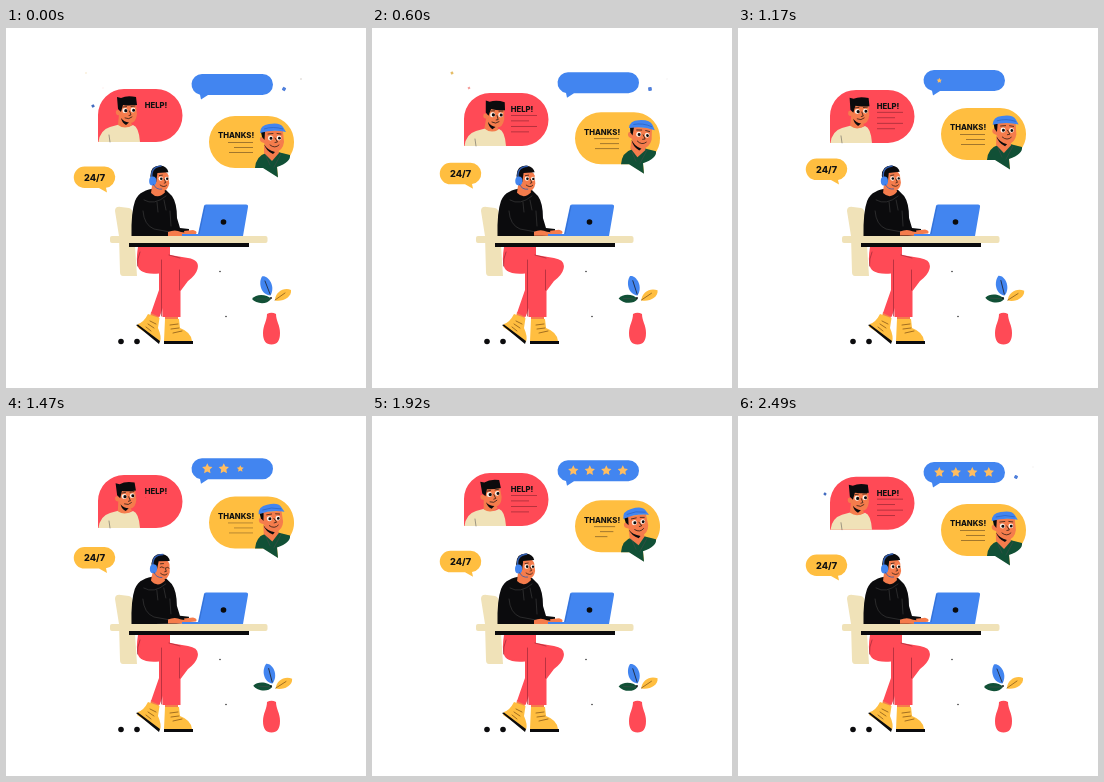
An HTML page for the animation above (2520 ms loop, 360 px wide and 360 px high).

```html
<!DOCTYPE html>
<html lang="en">
<head>
<meta charset="utf-8">
<title>Support desk</title>
<style>
  html, body { margin: 0; height: 100%; overflow: hidden; background: #fff; }
  svg { display: block; width: 100vw; height: 100vh; }
  text { font: 800 7.7px Inter, sans-serif; fill: #111; }
  .red { fill: #ff4a56; }
  .yellow { fill: #ffbe40; }
  .blue { fill: #4285f0; }
  .cream { fill: #f0e2b8; }
  .green { fill: #115036; }
  .black { fill: #0b0b0d; }
  .white { fill: #fff3e8; }
  .skin { fill: #f57c4c; }
  .line { fill: none; stroke: #16120f; stroke-width: .7; stroke-linecap: round; stroke-linejoin: round; }
  .seam { stroke: #9e2937; }
  .fold { stroke: #4b4b4b; stroke-width: .5; }
  .detail { stroke: #7a4c13; }
</style>
</head>
<body>
<svg viewBox="0 0 360 360">
  <g id="confetti"></g>

  <g id="rating">
    <path class="blue" d="M196 46H256.500A10.500 10.500 0 0 1 256.500 67H202L195 71.500L194 66.800A10.500 10.500 0 0 1 196 46Z"/>
    <g id="stars"></g>
  </g>

  <g id="help">
    <path class="red" d="M92 114V87A26 26 0 0 1 118 61H150A26 26 0 0 1 150 114Z"/>
    <path class="cream" d="M92.500 114Q94 102 104 99L113 96.500Q120 101 127 97Q133 99 134 114Z"/>
    <path class="line fold" d="M103 107L104 114"/>
    <g id="helpHead">
      <path class="skin" d="M113 86L112 97Q119 102 126 97L124 92Z"/>
      <path class="skin" d="M113 75Q121 72 130 75L131 86Q130 95 124 95Q116 94 114 87Q109 88 110 83Q111 81 114 83Z"/>
      <path class="black" d="M111 69L115 70Q121 67 130 69L131 77Q122 78 117 77L115 84L112 81Z"/>
      <g class="eyes">
        <g class="white"><circle cx="119" cy="82.500" r="2.500"/><circle cx="127" cy="82" r="2.400"/></g>
        <g class="black"><circle cx="119.800" cy="82.700" r="1.600"/><circle cx="127.600" cy="82.200" r="1.500"/></g>
      </g>
      <path class="line" d="M117 79L120.500 78.500M125 78.500L129 78M123.500 83L125 87L123 87.500M119 90Q123 92 126 89"/>
      <path class="black" d="M115 90Q118 94 123 94.500L120 97Q116 95 115 90Z"/>
    </g>
    <text x="138.800" y="80">HELP!</text>
    <g id="helpLines"></g>
  </g>

  <g id="thanks">
    <path class="yellow" d="M229 88H262A26 26 0 0 1 271 138.400L272 149L258 140H229A26 26 0 0 1 229 88Z"/>
    <path class="green" d="M249 140Q250 128 260 125L272 124L284 127Q285 134 271 139L272 149.500L257 140Z"/>
    <path class="line fold" d="M260 128L264 137M275 126L268 139"/>
    <g id="thanksHead">
      <path class="skin" d="M258 117V125L266 133L273 125L272 118Z"/>
      <path class="skin" d="M257 103H277L278 114Q277 122 270 124Q261 122 258 115Q253 114 254 110Q255 108 257 110Z"/>
      <path class="black" d="M255 104H259L258.500 112L256 109Z"/>
      <path class="blue" d="M254 105Q254 97 263 96Q274 94 277 99L280 104Q267 101 254 105Z"/>
      <path d="M258 101Q267 98 277 101" fill="none" stroke="#2b62bd" stroke-width=".7"/>
      <g class="eyes">
        <g class="white"><circle cx="264.500" cy="110" r="2.500"/><circle cx="273" cy="110" r="2.400"/></g>
        <g class="black"><circle cx="265" cy="110.200" r="1.500"/><circle cx="273.400" cy="110.200" r="1.400"/></g>
      </g>
      <g class="line lids"><path d="M262.500 110.500Q265 108.500 267 110.500M271.500 110.500Q273 108.500 275.500 110.500"/></g>
      <path class="line" d="M262 106L267 105.500M271 105.500L275 106M269 110L271.500 114L269 114.500M264 117Q269 121 273 117"/>
      <path class="black" d="M258 116Q261 122 269 124L267 126Q260 123 258 116Z"/>
    </g>
    <text x="212" y="110.300">THANKS!</text>
    <g id="thanksLines"></g>
  </g>

  <g id="hours">
    <path class="yellow" d="M78.500 138.500H98.500A10.700 10.700 0 0 1 100 159.800L101 164.500L93 160H78.500A10.700 10.700 0 0 1 78.500 138.500Z"/>
    <text x="78" y="152.600" style="font-size:9.2px">24/7</text>
  </g>

  <path class="cream" d="M109 183Q109 178 115 179L123 180Q127 181 127 187L131 248H117Q114 248 114 244L113 208Z"/>
  <g class="black">
    <circle cx="115" cy="313.500" r="2.800"/><circle cx="131" cy="313.500" r="2.800"/>
    <circle cx="214" cy="243.500" r=".7"/><circle cx="220" cy="288.500" r=".7"/>
  </g>

  <path class="skin" d="M145 284L153 288L152 293L144 289ZM159 286H172V293H159Z"/>
  <path class="red" d="M132 219Q129 237 134 242Q141 247 153 245.500L153 262L145 285L153.500 289L158 277L164 240V219Z"/>
  <path class="red" d="M134 219H163L164 227L182 230Q194 232 191.500 241Q190 247 182 253L174.500 263V289H156.500L155 245L135 243Z"/>
  <path class="line seam" d="M155.500 232V288M163 227L174 230M173.500 242V262M131.500 238Q131 231 134 224"/>
  <path class="yellow" d="M142 286L153.500 290L152 300Q156 309 154 314L131 299L132 296Q138 294 142 286ZM159 291H173L174 300Q185 304 186 313H158Z"/>
  <path class="black" d="M130 297L132 296.500L154 313L153 316ZM158 313H187V316H158Z"/>
  <path class="line detail" d="M144 293L150 296M142 296L148 300M140 299L145 303M164 297L172 296M165 301L173 300M167 305L176 303"/>

  <g id="torso">
    <path class="black" d="M137 164Q146 158 160 162L166 168Q171 175 171 190L174 200L183 201V207L170 208H125.500Q125 184 129 173Q132 166 137 164Z"/>
    <path class="line fold" d="M138 172Q148 178 160 168M151 174L152 184M158 172L160 182M137 183Q138 197 148 201L164 204M164 183L165 198"/>
    <g id="head">
      <path class="skin" d="M146 156L145 165Q152 172 159 164L157 158Z"/>
      <path class="skin" d="M148 144Q159 140 162 147L163 155Q162 162 157 163Q149 161 147 154Z"/>
      <path class="black" d="M144 148Q144 137.500 154 137.500Q161 138.500 162 144L151 145L150 154L145 153Z"/>
      <path d="M146 152Q143 139 155 138" fill="none" stroke="#315db0" stroke-width="1.500"/>
      <ellipse class="blue" cx="146.500" cy="153" rx="3.600" ry="4.500"/>
      <path d="M147 156Q150 162 156 161" fill="none" stroke="#315db0" stroke-width=".8"/>
      <g class="eyes">
        <g class="white"><circle cx="154.500" cy="150.500" r="2.200"/><circle cx="160.500" cy="150.500" r="2"/></g>
        <g class="black"><circle cx="155" cy="150.600" r="1.300"/><circle cx="160.900" cy="150.600" r="1.200"/></g>
      </g>
      <g class="line lids"><path d="M153 151Q154.500 149.500 156.500 151M159 151Q160.500 149.500 162 151"/></g>
      <path class="line" d="M153 147.500L156 147M158 151L159.500 154.500L158 155M154 157Q158 160 160.500 157"/>
    </g>
  </g>
  <path id="hands" class="skin" d="M162 204Q169 201 175 204L182 205V207L178 208H162ZM178 203L187 202Q192 203 190 206L179 207Z"/>

  <path class="blue" d="M200 176.500H240Q242.500 176.500 242 179L237 208H176V206H192L198 178Q198 176.500 200 176.500Z"/>
  <path d="M193 206L199 178" stroke="#2e67c8" stroke-width=".7"/>
  <circle class="black" cx="217.500" cy="194" r="2.800"/>
  <rect class="cream" x="104" y="208" width="157.500" height="7" rx="2"/>
  <rect class="black" x="123" y="215" width="120" height="4"/>

  <g id="leaves">
    <g>
      <path class="blue" d="M264.500 267.500C255 267 252 255 256 248.500C262 247 270 258 264.500 267.500Z"/>
      <path class="line" stroke-width=".5" d="M264 266L259 253"/>
    </g>
    <g>
      <path class="yellow" d="M269 272.500C269 264 278 259 285 262C286 269 277 274 269 272.500Z"/>
      <path class="line detail" d="M269 272L279 265"/>
    </g>
    <g>
      <path class="green" d="M265 271C261 277 250 276 246 271C250 265.500 261 266 265 271Z"/>
      <path class="line fold" d="M264 271H251"/>
    </g>
    <circle class="black" cx="265" cy="270" r=".9"/>
  </g>
  <path class="red" d="M261 286Q265.500 283.500 270 286C270 293 274 297 274 305Q274 316.500 265.500 316.500T257 305C257 297 261 293 261 286Z"/>
</svg>

<script>
const LOOP = 2520, TAU = Math.PI * 2;
const $ = id => document.getElementById(id);
const clamp = v => Math.max(0, Math.min(1, v));
const mod = (v, n) => ((v % n) + n) % n;
const ease = v => 1 - (1 - clamp(v)) ** 2;

function add(parent, tag, attrs) {
  const node = document.createElementNS("http://www.w3.org/2000/svg", tag);
  for (const key in attrs) node.setAttribute(key, attrs[key]);
  return $(parent).appendChild(node);
}
const place = (node, value) => node.setAttribute("transform", value);
const floatBy = (id, y) => place($(id), `translate(0 ${y})`);
const turn = (id, angle, x, y) => place($(id), `rotate(${angle} ${x} ${y})`);

const starPoints = Array.from({ length: 10 }, (_, i) => {
  const r = i % 2 ? 2.7 : 5.4, a = i * TAU / 10 - TAU / 4;
  return [r * Math.cos(a), r * Math.sin(a)].map(n => n.toFixed(2));
}).join(" ");
const stars = [0, 1, 2, 3].map(() => add("stars", "polygon", { points: starPoints, fill: "#ffbd60" }));

const makeLines = (id, color, rows) => rows.map(([x, y, width]) => ({
  width, node: add(id, "rect", { x, y, height: .8, fill: color })
}));
const helpLines = makeLines("helpLines", "#a52c38", [[139, 83, 26], [139, 88.5, 18], [139, 94, 26], [139, 99.5, 18]]);
const thanksLines = makeLines("thanksLines", "#8b6527", [[222, 114, 25], [228, 119, 19], [223, 124, 24]]);
const drawLines = (lines, t, start) => lines.forEach(({ node, width }, i) =>
  node.setAttribute("width", width * ease((t - start - 30 * i) / 200)));

// x, y, radius, colour, start, lifetime
const confetti = [
  [80, 45, 1.3, "#e5bd68", 2490, 1080],
  [97, 60, 1.2, "#f5a09d", 2490, 1080],
  [278, 61, 2, "#4f7fdb", 2160, 1380],
  [295, 51, 1.2, "#b3a99f", 2480, 650],
  [87, 78, 1.4, "#426bc0", 2420, 220]
].map(([x, y, r, fill, start, life]) => ({
  x, y, start, life, node: add("confetti", "rect", { x: -r, y: -r, width: 2 * r, height: 2 * r, rx: r * .4, fill })
}));

function blink(id, closed) {
  $(id).querySelector(".eyes").style.display = closed ? "none" : "";
  $(id).querySelector(".lids").style.display = closed ? "" : "none";
}

function draw(now) {
  const t = now % LOOP, half = t % (LOOP / 2);
  const sin = Math.sin(TAU * t / LOOP), cos = Math.cos(TAU * t / LOOP);
  const nod = Math.sin(2 * TAU * t / LOOP);

  floatBy("rating", 2 * (cos - 1));
  floatBy("help", 4 * sin);
  floatBy("thanks", 4 * (cos - 1));
  floatBy("hours", 4 * (cos - 1));

  turn("helpHead", 5 * sin, 118, 101);
  turn("thanksHead", 7 * sin, 266, 128);
  turn("head", 1 + 5 * nod, 150, 167);
  turn("torso", -.4 * nod, 148, 208);
  floatBy("hands", .5 * Math.sin(8 * TAU * t / LOOP));
  blink("head", t > 1410 && t < 1530);
  blink("thanksHead", t > 2160 && t < 2280);

  stars.forEach((star, i) =>
    place(star, `translate(${201.3 + 16.5 * i} 56.5) scale(${clamp((t - 1110 - 140 * i) / 120)})`));
  drawLines(helpLines, half, 210);
  drawLines(thanksLines, t < 1700 ? LOOP : t, 1800);
  $("thanksLines").setAttribute("opacity", t < 1700 ? clamp((1700 - t) / 300) : 1);

  const leaves = $("leaves").children;
  [[7, 265, 285], [2.5, 267, 290], [4, 265, 290]].forEach(([angle, x, y], i) =>
    place(leaves[i], `rotate(${angle * (1 - cos) / 2} ${x} ${y})`));

  for (const { x, y, start, life, node } of confetti) {
    const p = mod(t - start, LOOP) / life;
    const size = p < 1 ? Math.sqrt(Math.sin(Math.PI * p)) : 0;
    place(node, `translate(${x} ${y}) rotate(${120 * p}) scale(${size})`);
  }
}

function tick() {
  draw(performance.now());
  requestAnimationFrame(tick);
}
tick();
</script>
</body>
</html>
```
